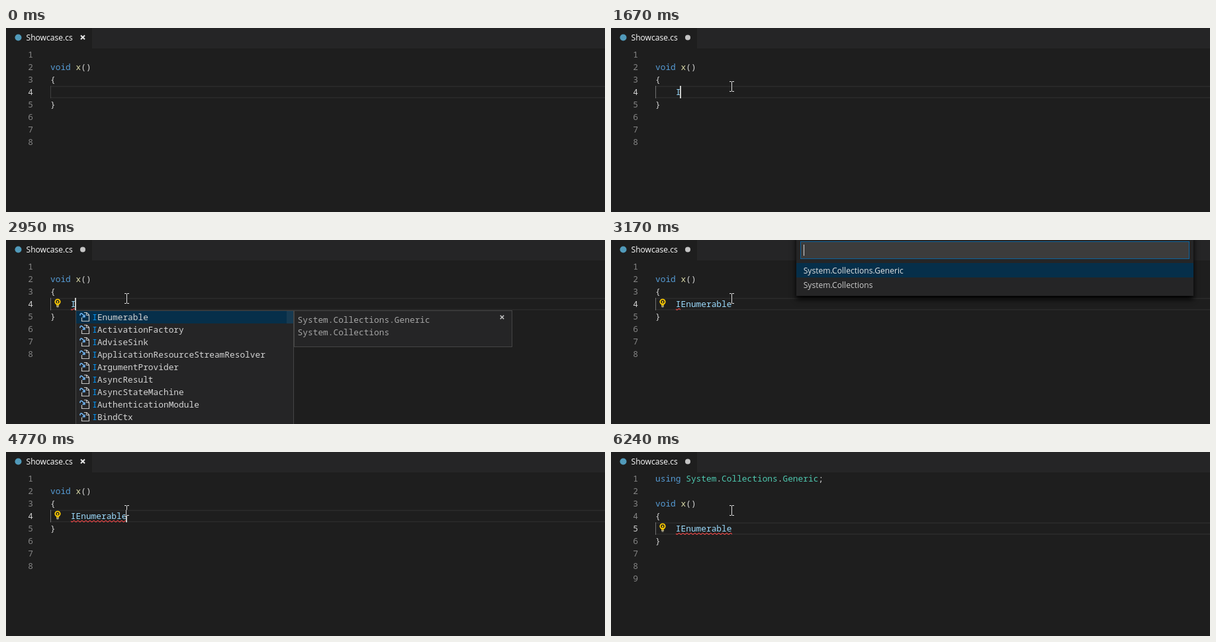
An HTML page with a canvas that plays this animation: 905x280 px, repeating every 6.63 s.

```html
<!DOCTYPE html>
<html lang="en">
<head>
<meta charset="utf-8">
<title>Code editor</title>
<style>
  html, body { margin: 0; width: 100%; height: 100%; overflow: hidden; background: #1e1e1e; }
  canvas { display: block; width: 905px; height: 280px; }
</style>
</head>
<body>
<canvas id="stage" width="905" height="280"></canvas>
<script>
const ctx = document.getElementById('stage').getContext('2d');
const LOOP = 6630, LINE = 19, TOP = 31, LEFT = 67;
const MONO = '500 12.83px "Noto Sans Mono", monospace';
const UI = '500 12.1px "Open Sans", sans-serif';
const CHAR = 7.698;
const PLAIN = '#d4d4d4', BLUE = '#569cd6', TYPE = '#4ec9b0', VAR = '#9cdcfe', FUNC = '#dcdcaa';
const PANEL = '#252526', EDGE = '#454545', SELECTED = '#062f4a';
const NAMES = ['IEnumerable', 'IActivationFactory', 'IAdviseSink',
  'IApplicationResourceStreamResolver', 'IArgumentProvider', 'IAsyncResult',
  'IAsyncStateMachine', 'IAuthenticationModule', 'IBindCtx'];
const SPACES = ['System.Collections.Generic', 'System.Collections'];

// moments in ms
const T = { enter: 60, arrive: 720, press: 850, caret: 870, release: 960, rest: 1060,
  type: 1670, list: 1850, bulb: 1950, error: 2410, bar: 2950, pick: 3170,
  longError: 4000, close: 4640, clean: 4770, insert: 4800, bulbMove: 5030 };
const CARET_ON = [[T.caret, 1340], [T.type, 2130], [2670, T.pick], [T.close, 5280], [5770, 6240]];

const within = (t, a, b) => t >= a && t < b;
const lerp = (a, b, k) => a + (b - a) * k;
const clamp = k => Math.max(0, Math.min(1, k));
const smooth = k => k * k * (3 - 2 * k);

function rect(x, y, w, h, color) {
  ctx.fillStyle = color;
  ctx.fillRect(x, y, w, h);
}

function disc(x, y, r, color) {
  ctx.fillStyle = color;
  ctx.beginPath();
  ctx.arc(x, y, r, 0, 7);
  ctx.fill();
}

function stroke(points, color, width) {
  ctx.strokeStyle = color;
  ctx.lineWidth = width;
  ctx.beginPath();
  points.forEach(([x, y]) => ctx.lineTo(x, y));
  ctx.stroke();
}

function text(str, x, y, color, font = MONO) {
  ctx.font = font;
  ctx.fillStyle = color;
  ctx.fillText(str, x, y);
}

function tokens(parts, x, y) {
  for (const [str, color] of parts) {
    text(str, x, y, color);
    x += str.length * CHAR;
  }
}

function cross(x, y, r, color, width) {
  stroke([[x - r, y - r], [x + r, y + r]], color, width);
  stroke([[x - r, y + r], [x + r, y - r]], color, width);
}

function box(x, y, w, h) {
  rect(x, y, w, h, EDGE);
  rect(x + 1, y + 1, w - 2, h - 2, PANEL);
}

function drawTab(t) {
  rect(0, 0, 905, TOP, PANEL);
  rect(0, 0, 130, TOP, '#1e1e1e');
  disc(18.5, 14.5, 5, '#519aba');
  text('Showcase.cs', 30.5, 18.5, '#ffffff', UI);
  const saved = t < T.type || within(t, T.clean, T.insert);
  if (saved) cross(116, 14.3, 3, '#e8e8e8', 2);
  else disc(116, 14.4, 4, '#c5c5c5');
}

function squiggle(x, y, w) {
  ctx.save();
  ctx.beginPath();
  ctx.rect(x, y, w, 3);
  ctx.clip();
  const points = [];
  for (let i = -6; i < w + 6; i += 6) points.push([x + i + 1.75, y + 2.7], [x + i + 4.75, y + 0.2]);
  stroke(points, '#f04848', 1.1);
  ctx.restore();
}

function drawBulb(y) {
  disc(78, y + 5, 4.6, '#fc0');
  rect(76, y + 8, 4, 2.5, '#fc0');
  disc(78, y + 5, 2.7, '#1e1e1e');
  disc(78, y + 5, 1.2, '#fc0');
  rect(77.5, y + 6, 1, 4, '#fc0');
  rect(76, y + 11, 4, 1, '#d0c8a0');
  rect(76.5, y + 12.5, 3, 1, '#d0c8a0');
}

function codeLines(inserted) {
  const dot = ['.', PLAIN];
  const body = [[], [['void ', BLUE], ['x', FUNC], ['()', PLAIN]], [['{', PLAIN]], [], [['}', PLAIN]], [], [], []];
  const using = [['using ', BLUE], ['System', TYPE], dot, ['Collections', TYPE], dot, ['Generic', TYPE], [';', PLAIN]];
  return inserted ? [using, ...body] : body;
}

function drawEditor(t) {
  const inserted = t >= T.insert;
  const current = inserted ? 4 : 3;
  const y = TOP + current * LINE;

  rect(LEFT, y, 905 - LEFT, 2, '#282828');
  rect(LEFT, y + LINE - 2, 905 - LEFT, 2, '#282828');
  rect(LEFT, y, 1, LINE, t < T.type ? '#404040' : '#707070');

  codeLines(inserted).forEach((line, i) => {
    const base = TOP + i * LINE + 14;
    text(String(i + 1), 33.3, base, i === current ? '#d0d0d0' : '#858585');
    tokens(line, LEFT, base);
  });

  const word = t < T.type ? '' : t < T.pick ? 'I' : 'IEnumerable';
  const wordX = LEFT + 4 * CHAR;
  text(word, wordX, y + 14, VAR);
  if (t >= T.error) squiggle(98, y + 16, t < T.longError ? 7 : 85);
  if (t >= T.bulb) drawBulb(t < T.bulbMove ? 89 : 108);
  if (CARET_ON.some(([a, b]) => within(t, a, b))) {
    rect(Math.floor(wordX + word.length * CHAR - 0.7), y, 2, LINE, '#c8c9c7');
  }
}

function itemIcon(y) {
  stroke([[114.5, y + 10], [114.5, y + 15.5], [125.5, y + 15.5], [125.5, y + 6], [122, y + 2.5], [118, y + 2.5]], '#c5c5c5', 1.2);
  stroke([[121.5, y + 3], [121.5, y + 6.5], [125, y + 6.5]], '#c5c5c5', 1);
  stroke([[112, y + 7], [112, y + 5], [113.5, y + 3.5], [115.5, y + 4.5], [118.5, y + 8.5]], '#75beff', 1.4);
  stroke([[115.5, y + 9], [119, y + 9], [119, y + 5.5]], '#75beff', 1.3);
}

function drawList(t) {
  box(105, 107, 330, 200);
  rect(106, 108, 328, LINE, SELECTED);
  NAMES.forEach((name, i) => {
    const y = 108 + i * LINE;
    itemIcon(y);
    tokens([['I', '#0097fb'], [name.slice(1), PLAIN]], 130.2, y + 14);
  });
  if (t >= T.bar) rect(424, 108, 10, LINE, 'rgba(121,121,121,.15)');

  box(435, 107, 330, 56);
  SPACES.forEach((name, i) => text(name, 440.6, 126 + i * LINE, '#a6a6a6'));
  cross(749.5, 117.5, 2.7, '#c5c5c5', 1.6);
}

function drawPicker(t) {
  ctx.save();
  ctx.shadowColor = '#000';
  ctx.shadowBlur = 8;
  ctx.shadowOffsetY = 5;
  rect(280, -10, 600, 95, PANEL);
  ctx.restore();
  rect(286, 2, 588, 27, '#0e639c');
  rect(287, 3, 586, 25, '#3c3c3c');
  if (!within(t, 3660, 4150)) rect(291, 7, 1, 17, '#d4d4d4');
  rect(280, 35, 600, 22, SELECTED);
  SPACES.forEach((name, i) => text(name, 290.7, 51 + i * 22, i ? '#cccccc' : '#e4e4e4', UI));
}

function pointerAt(t) {
  if (t < T.press) {
    const step = Math.floor((t - T.enter) / 33) * 33;
    const k = smooth(clamp((step + 33) / (T.arrive - T.enter)));
    return [lerp(806, 186, k), lerp(282, 102, k)];
  }
  const k = smooth(clamp((t - T.press - 20) / (T.rest - T.press - 20)));
  return [lerp(186, 182, k), lerp(102, 89, k)];
}

function drawPointer(t) {
  if (t < T.enter) return;
  const [x, y] = pointerAt(t).map(Math.round);
  ctx.globalCompositeOperation = 'difference';
  for (const edge of [y - 8, y + 7]) {
    rect(x - 3, edge, 3, 1, '#fff');
    rect(x + 1, edge, 3, 1, '#fff');
  }
  rect(x, y - 7, 1, 14, '#fff');
  ctx.globalCompositeOperation = 'source-over';
  if (within(t, T.press, T.release)) disc(x - 2, y - 1, 12, 'rgba(255,255,0,.5)');
}

function draw(t) {
  rect(0, 0, 905, 280, '#1e1e1e');
  drawTab(t);
  drawEditor(t);
  if (within(t, T.list, T.pick)) drawList(t);
  if (within(t, T.pick, T.close)) drawPicker(t);
  drawPointer(t);
}

const start = performance.now();
function frame() {
  draw((performance.now() - start) % LOOP);
  requestAnimationFrame(frame);
}
frame();
</script>
</body>
</html>
```
